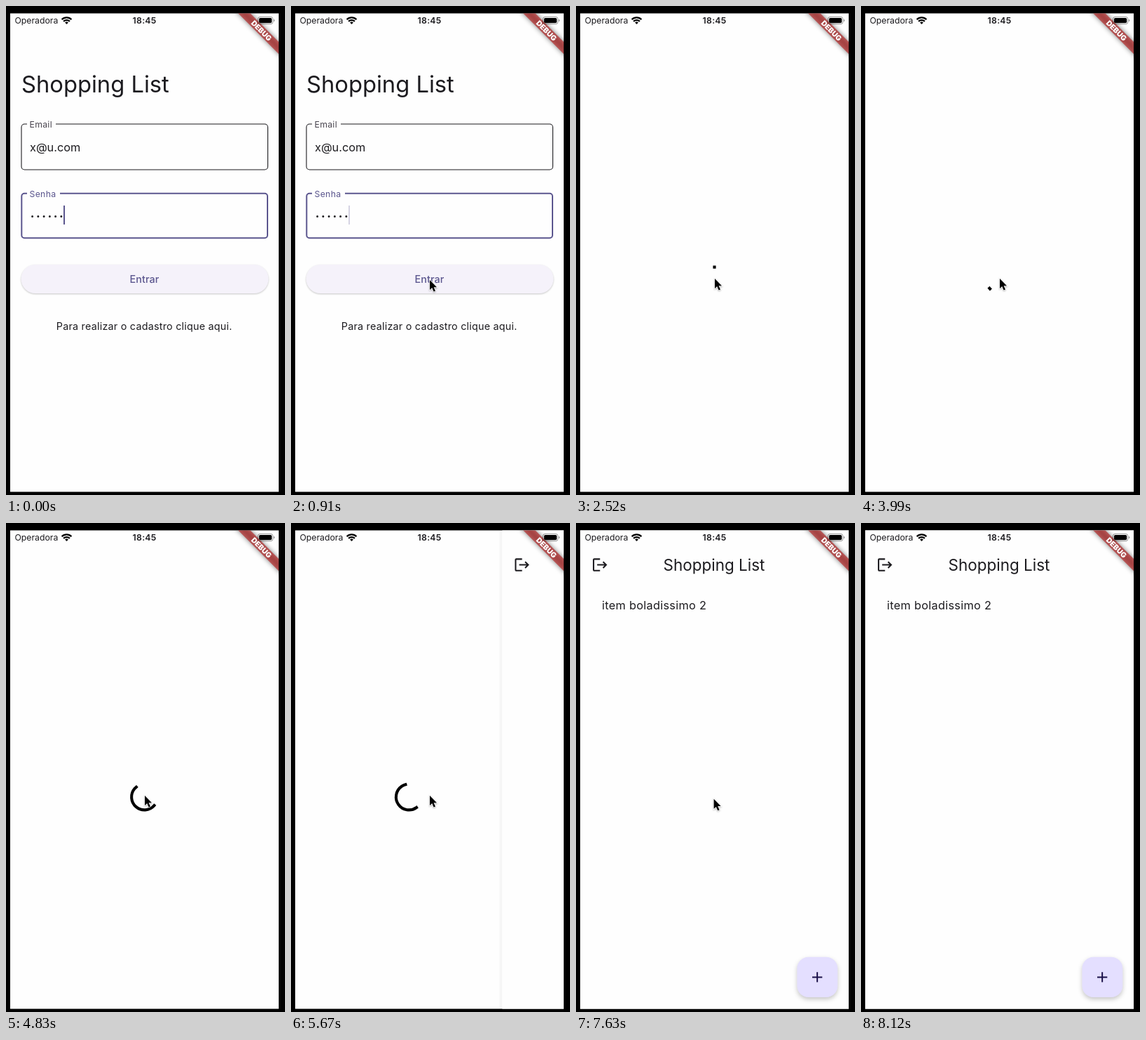
Animation of 398 by 696 pixels, one loop 8.4 s. Source, as an HTML page:

```html
<!DOCTYPE html>
<html lang="pt">
<head>
<meta charset="utf-8">
<title>Shopping List</title>
<style>
  html, body { margin: 0; width: 100%; height: 100%; overflow: hidden; background: #000; }
  svg { display: block; width: 398px; height: 696px; }
  text { font-family: Inter, Roboto, sans-serif; fill: #1c1b1f; white-space: pre; }
  .mid { text-anchor: middle; }
  .label { font-size: 12.25px; letter-spacing: .3px; }
  .raised { filter: drop-shadow(0 1px 1px rgba(0, 0, 0, .22)); }
  .fab { filter: drop-shadow(0 3px 3px rgba(0, 0, 0, .22)); }
</style>
</head>
<body>
<svg viewBox="0 0 398 696">
  <defs>
    <clipPath id="screen"><rect x="6" y="10.5" width="383" height="681"/></clipPath>
    <clipPath id="pill"><rect x="21.5" y="368" width="353" height="41" rx="20.5"/></clipPath>
    <filter id="blur" x="-50%" y="-100%" width="200%" height="300%"><feGaussianBlur stdDeviation="3.5"/></filter>
  </defs>

  <g clip-path="url(#screen)">
    <rect width="398" height="696" fill="#fefefe"/>

    <g id="login">
      <text x="22" y="123" font-size="32.7">Shopping List</text>

      <rect x="22" y="168" width="351.5" height="65" rx="4.5" fill="none" stroke="#1c1b1f" stroke-width="1.1"/>
      <rect x="30" y="164" width="41" height="8" fill="#fefefe"/>
      <text class="label" x="33.5" y="173" style="fill:#49454f">Email</text>
      <text x="34" y="207" font-size="16.3">x@u.com</text>

      <rect x="22.3" y="266.8" width="350.7" height="63.4" rx="4" fill="none" stroke="#5b568e" stroke-width="2"/>
      <rect x="30" y="263" width="47" height="8" fill="#fefefe"/>
      <text class="label" x="33.5" y="271.5" style="fill:#5b568e">Senha</text>
      <path d="M37.6 299.5h42" stroke="#1c1b1f" stroke-width="3" stroke-linecap="round" stroke-dasharray="0 8.25"/>
      <rect id="caret" x="82" y="284" width="2" height="27" fill="#5b568e"/>

      <rect class="raised" x="21.5" y="368" width="353" height="41" rx="20.5" fill="#f5f2fa"/>
      <g clip-path="url(#pill)">
        <rect id="press" x="21" y="368" width="354" height="41" fill="#f2ecfa"/>
        <circle id="ripple" cx="197.2" cy="388.5" fill="#5b568e"/>
      </g>
      <text class="mid" x="197.5" y="393.5" font-size="14.3" font-weight="500" letter-spacing=".1" style="fill:#5b568e">Entrar</text>
      <text class="mid" x="197.2" y="461" font-size="14.3" letter-spacing=".25">Para realizar o cadastro clique aqui.</text>
    </g>

    <g id="loading">
      <circle id="arc" cx="197.5" cy="390" r="18.4" pathLength="360" fill="none" stroke="#000" stroke-width="4.1" stroke-linecap="square"/>
    </g>

    <g id="home">
      <rect x="2" y="10" width="4" height="682" fill="#000" opacity=".03"/>
      <rect x="6" y="10" width="383" height="682" fill="#fefefe"/>
      <path transform="translate(22 47.3) scale(1.021)" fill="#1c1b1f" d="M17 7l-1.41 1.41L18.17 11H8v2h10.17l-2.58 2.58L17 17l5-5zM4 5h8V3H4c-1.1 0-2 .9-2 2v14c0 1.1.9 2 2 2h8v-2H4z"/>
      <text class="mid" x="197" y="68" font-size="22.46">Shopping List</text>
      <text id="item" x="37" y="123" font-size="16.3" letter-spacing=".3">item boladissimo 2</text>
      <rect class="fab" x="315.4" y="617.8" width="57.8" height="57.2" rx="16.3" fill="#e4dfff"/>
      <path d="M337 646.5h14.3M344.15 639.3v14.3" stroke="#1b1149" stroke-width="2"/>
    </g>

    <!-- debug ribbon -->
    <g transform="translate(389 10.5) rotate(45) scale(1.021)">
      <rect x="-60" y="28" width="120" height="12" filter="url(#blur)" opacity=".5"/>
      <rect x="-60" y="28" width="120" height="12" fill="#b71c1c" opacity=".63"/>
      <text class="mid" y="37.7" font-size="10.2" font-weight="900" style="fill:#fff">DEBUG</text>
    </g>

    <!-- status bar -->
    <text x="12.5" y="25.3" font-size="12.25">Operadora</text>
    <text class="mid" x="197.6" y="25.3" font-size="12.25" font-weight="600" letter-spacing=".3">18:45</text>
    <g fill="none" stroke="#000" stroke-width="2.3">
      <path d="M79.6 19.2a9.8 9.8 0 0 1 13.8 0M82.1 21.9a6.2 6.2 0 0 1 8.8 0"/>
      <path d="M86.5 26l-2.4-2.4a3.4 3.4 0 0 1 4.8 0z" fill="#000" stroke="none"/>
    </g>
    <rect x="359.4" y="15.4" width="21.4" height="10.4" rx="3.2" fill="none" stroke="#000" stroke-opacity=".4"/>
    <rect x="361" y="17" width="18.2" height="7.2" rx="1.8"/>
    <path d="M382 18.8v3.6q1.3-.5 1.3-1.8t-1.3-1.8z" opacity=".45"/>
  </g>

  <path id="pointer" d="M0 0v14l3.2-2.9 2.4 5.3 2.4-1-2.4-5.1h4.4z" stroke="#fff" stroke-width="1.4" paint-order="stroke" style="filter:drop-shadow(0 1px 1px rgba(0,0,0,.3))"/>
</svg>

<script>
const LOOP = 8400, STEP = 70, RATE = 1.05; // RATE: stage time per app time
const el = {};
document.querySelectorAll('svg > path[id], g[id], rect[id], circle[id], text[id]').forEach(e => el[e.id] = e);

const clamp = v => Math.min(1, Math.max(0, v));
const ramp = (t, a, b) => clamp((t - a) / (b - a));
const show = (e, on) => e.style.display = on ? '' : 'none';
const move = (e, x, y) => e.setAttribute('transform', `translate(${x} ${y})`);

function cubic(x1, y1, x2, y2) {
  const at = (s, a, b) => 3 * (1 - s) ** 2 * s * a + 3 * (1 - s) * s * s * b + s ** 3;
  return x => {
    if (x <= 0 || x >= 1) return clamp(x);
    let lo = 0, hi = 1;
    for (let i = 0; i < 24; i++) {
      const m = (lo + hi) / 2;
      if (at(m, x1, x2) < x) lo = m; else hi = m;
    }
    return at(lo, y1, y2);
  };
}
const fastOutSlowIn = cubic(.4, 0, .2, 1);
const slideOut = cubic(.35, .91, .33, .97);
const easeInOut = cubic(.42, 0, .58, 1);

function caretOpacity(t) {
  const p = ((t - 990) / (1000 * RATE) + 2) % 1;
  const quarter = v => Math.floor(v * 4 + 1e-6) / 4;
  return p < .65 ? 1 - quarter(ramp(p, .5, .65)) : quarter(ramp(p, .85, 1));
}

function drawLogin(t) {
  el.caret.setAttribute('opacity', caretOpacity(t));
  const fade = 1 - ramp(t, 1750, 2100);
  el.press.setAttribute('opacity', ramp(t, 1400, 1540) * fade);
  el.ripple.setAttribute('r', 53 + 130 * ramp(t, 1450, 1865));
  el.ripple.setAttribute('opacity', t < 1470 ? 0 : .13 * ramp(t, 1435, 1510) * fade);
}

function drawSpinner(t) {
  const ms = Math.max(0, (t - 2520) / RATE - 18);
  const cycle = ms / 1333 % 1;
  const head = 270 * fastOutSlowIn(clamp(cycle * 2));
  const tail = 270 * fastOutSlowIn(clamp(cycle * 2 - 1));
  const start = -90 + tail + ms / 2222 * 360 + cycle * 90;
  el.arc.setAttribute('stroke-dasharray', `${Math.max(head - tail, .1)} 400`);
  el.arc.setAttribute('transform', `rotate(${start} 197.5 390)`);
}

function drawPointer(t) {
  show(el.pointer, t >= 210 && t < 8120);
  let x = 198, y = t < 2240 ? 390 : t < 2520 ? 391 : 388;
  if (t < 910) {
    const p = 1 - easeInOut(ramp(t, 210, 910));
    x -= 8 * p;
    y += 247 * p;
  } else if (t >= 7630) {
    const p = ramp(t, 7560, 8120);
    x -= 11 * p;
    y += 308 * p * p;
  }
  move(el.pointer, x, y);
}

function draw(t) {
  const slide = slideOut(ramp(t, 5635, 6020 + 15));
  show(el.login, t < 2520);
  show(el.loading, t >= 2520 && t < 6020);
  show(el.home, t >= 5635);
  show(el.item, t >= 6230);
  drawLogin(t);
  drawSpinner(t);
  move(el.loading, -383 / 3 * slide, 0);
  move(el.home, t >= 6020 ? 0 : 383 * (1 - slide), 0);
  drawPointer(t);
}

const begin = performance.now();
function frame() {
  const t = (performance.now() - begin) % LOOP;
  draw(Math.floor(t / STEP) * STEP);
  requestAnimationFrame(frame);
}
frame();
</script>
</body>
</html>
```
